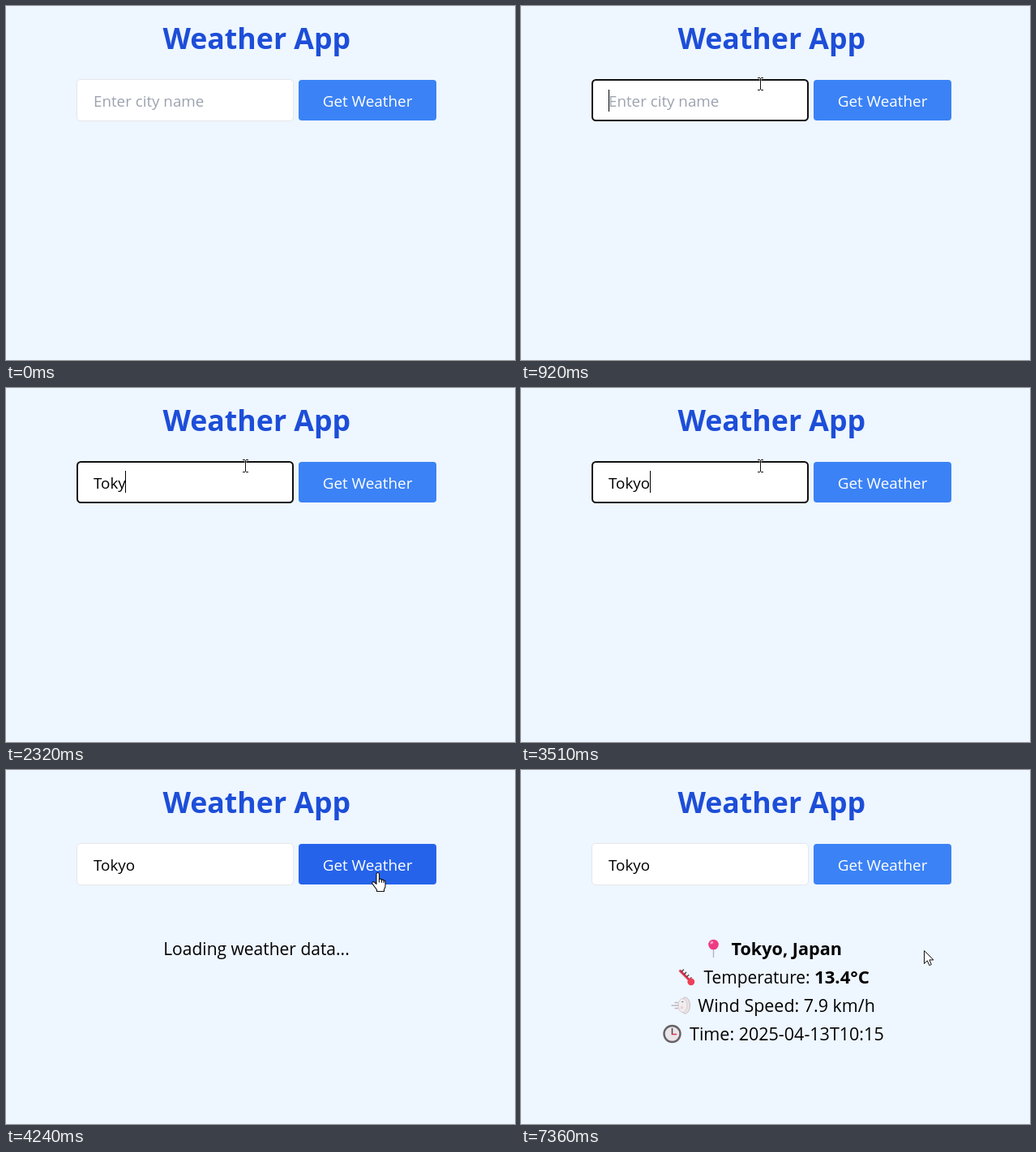
An HTML page that plays this animation: 628 by 436 pixels, repeating every 7.42 s.

```html
<!DOCTYPE html>
<html lang="en">
<head>
<meta charset="utf-8">
<title>Weather App</title>
<style>
  html, body { margin: 0; width: 100%; height: 100%; overflow: hidden; background: #eef6ff; }
  svg { display: block; width: 628px; height: 436px; font-family: "Open Sans", "Noto Sans", sans-serif; }
  text { white-space: pre; }
  .mid { text-anchor: middle; }
  .bold { font-weight: 700; }
  .field { font-size: 18.8px; }
  #loading, #result, #focus { animation: 7420ms step-end infinite; }
  #loading { animation-name: loading; }
  #result { animation-name: result; }
  #focus { animation-name: focus; }
  @keyframes loading { 0% { opacity: 0 } 57.14% { opacity: 1 } 82.07% { opacity: 0 } }
  @keyframes result { 0% { opacity: 0 } 82.07% { opacity: 1 } }
  @keyframes focus { 0% { opacity: 0 } 12.39% { opacity: 1 } 56.19% { opacity: 0 } }
</style>
</head>
<body>
<svg viewBox="0 0 628 436">
  <text class="mid bold" x="309.3" y="53" font-size="35.7" fill="#1d4ed8">Weather App</text>

  <rect x="87.5" y="90.5" width="267" height="51" rx="4.5" fill="#fff" stroke="#e5e7eb"/>
  <rect id="focus" x="88" y="91" width="266" height="50" rx="4.5" fill="none" stroke="#101010" stroke-width="2"/>
  <text id="hint" class="field" x="108" y="124" fill="#9ca3af">Enter city name</text>
  <text id="typed" class="field" x="108" y="124"></text>
  <rect id="caret" width="1" height="27"/>

  <rect id="button" x="361" y="91" width="170" height="50" rx="4" fill="#3b82f6"/>
  <text class="mid" x="446" y="124" font-size="18.9" fill="#fff">Get Weather</text>

  <text id="loading" class="mid" x="309" y="228" font-size="21">Loading weather data...</text>

  <g id="result">
    <!-- pin -->
    <path d="M237.5 220V230.5" stroke="#b9b4be" stroke-width="1.4" stroke-linecap="round"/>
    <circle cx="237.5" cy="215" r="6.3" fill="#ef3a82"/>
    <ellipse cx="235.4" cy="212.6" rx="2" ry="1.5" fill="#ff9cc4" transform="rotate(-35 235.4 212.6)"/>
    <text class="bold" x="259.5" y="228" font-size="21.6">Tokyo, Japan</text>

    <!-- thermometer -->
    <g stroke-linecap="round" fill="none">
      <path d="M196.5 247.5L209 260" stroke="#e5d5da" stroke-width="4.4"/>
      <path d="M196.5 247.5L209 260" stroke="#dc3048" stroke-width="2.6"/>
      <path d="M198.5 248l2-2M201.7 251.2l2-2M204.9 254.400l2-2M208.1 257.600l2-2" stroke="#46343a" stroke-width="1.3"/>
    </g>
    <circle cx="209.8" cy="260.8" r="4.4" fill="#ee3f57"/>
    <text x="225.5" y="263" font-size="20.9">Temperature: </text>
    <text class="bold" x="362" y="263" font-size="22.2">13.4°C</text>

    <!-- wind face -->
    <ellipse cx="202.5" cy="290" rx="6" ry="10" fill="#e9e4e7" stroke="#c4bdc2"/>
    <ellipse cx="199.5" cy="290" rx="5.5" ry="8.5" fill="#f2edef" stroke="#cdc6ca" stroke-width=".8"/>
    <path d="M198 285.500h2.500" stroke="#8d858c" stroke-width="1.2"/>
    <circle cx="198.5" cy="292.5" r="2" fill="#efd3d5"/>
    <path d="M194 290H186M193.500 286.500H190M193.500 293.500H190" stroke="#bdb8c0" stroke-width="1.3" stroke-linecap="round"/>
    <text x="218.3" y="298" font-size="21.45">Wind Speed: 7.9 km/h</text>

    <!-- clock -->
    <circle cx="186.5" cy="325" r="10" fill="#e9e5e9" stroke="#686367" stroke-width="2.4"/>
    <path d="M186.500 318.500V325.500" stroke="#4c464b" stroke-width="1.5" stroke-linecap="round"/>
    <path d="M186.500 325.500H191.500" stroke="#dc3850" stroke-width="1.6" stroke-linecap="round"/>
    <text x="208" y="333" font-size="21.5">Time: 2025-04-13T10:15</text>
  </g>

  <g id="mouse">
    <g id="beam" fill="none">
      <path d="M-3 -7.500H4M-3 7.500H4M.500 -7V7" stroke="#fff" stroke-width="2.4" opacity=".6"/>
      <path d="M-3 -7.500H0M1 -7.500H4M-3 7.500H0M1 7.500H4M.500 -7V7" stroke="#111"/>
    </g>
    <g id="hand" transform="translate(-8 -1)" fill="#fff" stroke="#111" stroke-width="1.1" stroke-linejoin="round">
      <path d="M6 14.500V2.200a1.700 1.700 0 0 1 3.400 0V9a1.600 1.600 0 0 1 3 .500a1.600 1.600 0 0 1 2.600.700a1.400 1.400 0 0 1 2 1.300V17q0 2-1.500 4V23.500H6.500V21.500Q3.500 17.500 1 14.200C-.2 12 2 11 3.500 12.200Z"/>
      <path d="M9.400 9v3.500M12.400 9.500v3.200M15 10.200v2.800" fill="none"/>
    </g>
    <path id="arrow" d="M.5 .5V16.500L4.300 12.900L6.800 18.600L9.300 17.500L6.900 11.900H12Z" fill="#fff" stroke="#111"/>
  </g>
</svg>
<script>
  const LOOP = 7420, BLINK = 530, FOCUS = 920, BLUR = 4170, LEAVE = 7360;
  const CITY = "Tokyo", KEYS = [1650, 2050, 2180, 2320, 2450];
  // time, x, y
  const PATH = [
    [130, 583, 390], [260, 505, 292], [390, 412, 172], [520, 352, 106], [650, 310, 98], [780, 295, 96],
    [3634, 295, 96], [3786, 340, 106], [3937, 420, 121], [4088, 459, 127]
  ];
  const $ = id => document.getElementById(id);
  const show = (id, on) => $(id).setAttribute("visibility", on ? "visible" : "hidden");
  const inside = ([x, y], left, right) => x >= left && x < right && y >= 91 && y < 141;

  // The pointer is sampled in coarse steps
  const snap = (t, start, step) => start + Math.floor((t - start) / step + 1e-6) * step;

  function pointer(t) {
    if (t >= LEAVE) return [497, 222];
    t = t < 3000 ? snap(t, 130, 65) : snap(t, 3710, 530 / 7);
    const i = PATH.findIndex(p => p[0] > t);
    if (i < 0) return PATH.at(-1).slice(1);
    const a = PATH[Math.max(i - 1, 0)], b = PATH[i];
    const k = i ? (t - a[0]) / (b[0] - a[0]) : 0;
    return [1, 2].map(n => Math.round(a[n] + (b[n] - a[n]) * k));
  }

  function drawField(t) {
    const pressed = KEYS.filter(k => k <= t);
    $("typed").textContent = CITY.slice(0, pressed.length);
    show("hint", !pressed.length);
    const since = t - (pressed.at(-1) ?? FOCUS);
    show("caret", t >= FOCUS && t < BLUR && Math.floor(since / BLINK) % 2 === 0);
    const width = pressed.length ? $("typed").getComputedTextLength() : 0;
    $("caret").setAttribute("x", 108 + Math.floor(width));
    $("caret").setAttribute("y", pressed.length ? 102 : 103);
  }

  function drawPointer(t) {
    const pos = pointer(t), seen = t >= 130;
    const onButton = inside(pos, 361, 531), onField = inside(pos, 87, 355);
    $("mouse").setAttribute("transform", `translate(${pos})`);
    show("hand", seen && onButton);
    show("beam", seen && onField);
    show("arrow", seen && !onButton && !onField);
    $("button").setAttribute("fill", seen && onButton ? "#2563eb" : "#3b82f6");
  }

  const anims = document.getAnimations();
  function frame() {
    const t = performance.now() % LOOP;
    anims.forEach(a => a.currentTime = t);
    drawField(t);
    drawPointer(t);
    requestAnimationFrame(frame);
  }
  frame();
</script>
</body>
</html>
```
